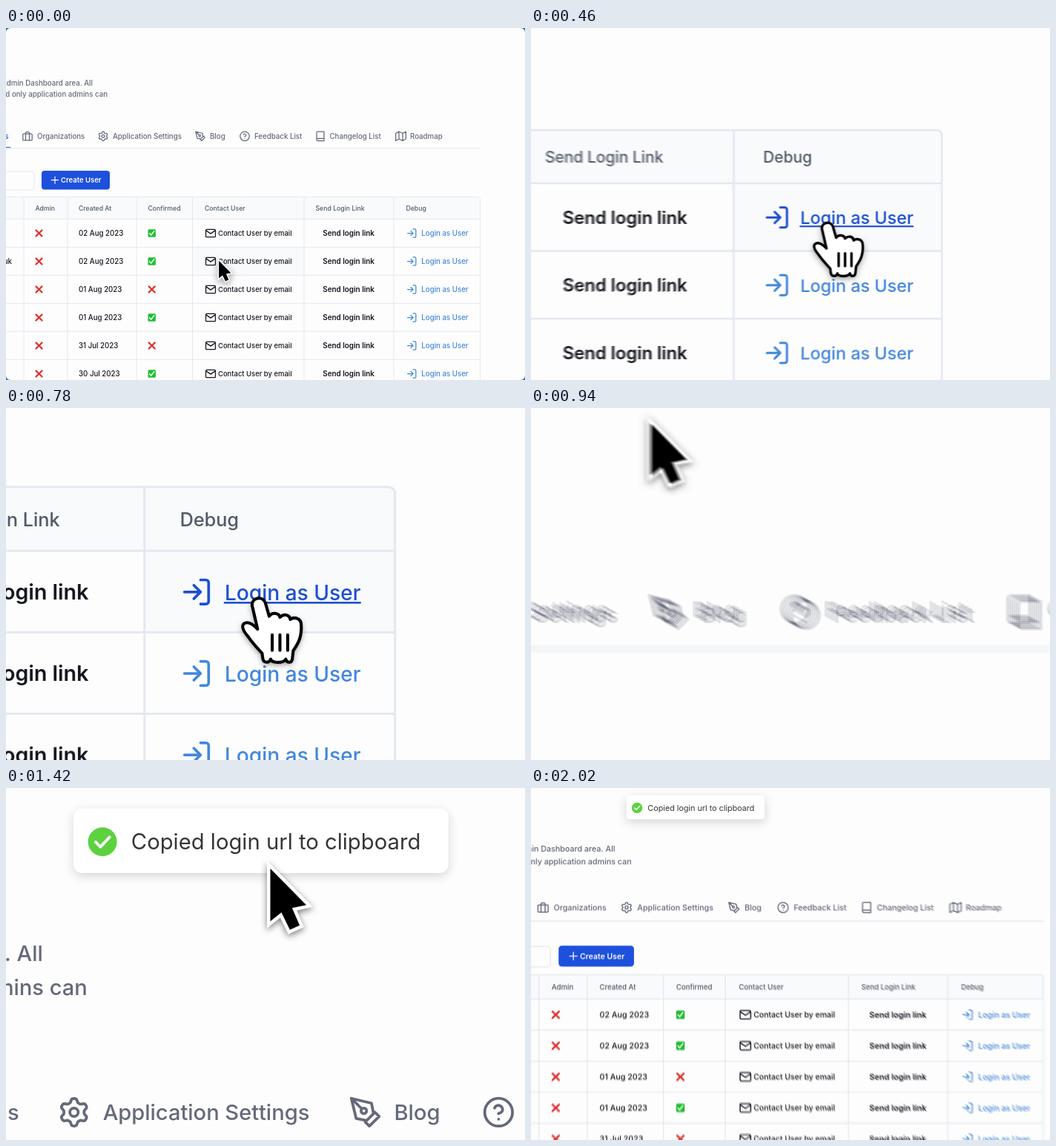
An HTML page with a canvas that plays this animation: 700x476 px, repeating every 2.04 s.

```html
<!DOCTYPE html>
<html lang="en">
<head>
<meta charset="utf-8">
<title>Admin dashboard</title>
<style>
html, body { margin: 0; width: 100%; height: 100%; overflow: hidden; background: #fdfdfd; }
canvas { display: block; }
</style>
</head>
<body>
<canvas id="stage" width="700" height="476"></canvas>
<script>
const W = 700, H = 476, LOOP = 2040;
const out = document.getElementById('stage').getContext('2d');
const buffer = document.createElement('canvas');
buffer.width = W;
buffer.height = H;
const c = buffer.getContext('2d');

const PAPER = '#fdfdfd', SHADE = '#f8fafc', LINE = '#e4e8f1', MUTED = '#64697a', HEAD = '#525a68',
  INK = '#14161f', LINK = '#4287de', LINK_HOVER = '#1d4fd0', BLUE = '#1d50dc';

// Critically damped spring from 0 to 1; t in ms, speed per second.
const spring = (t, start, speed) => {
  const x = Math.max(0, t - start) / 1000 * speed;
  return 1 - (1 + x) * Math.exp(-x);
};
const mix = (a, b, k) => a + (b - a) * k;
const ramp = (t, a, b) => Math.min(1, Math.max(0, (t - a) / (b - a)));

function gearPath() {
  let d = '';
  for (let i = 0; i < 72; i++) {
    const a = i * Math.PI / 36, r = 8.6 - 1.4 * Math.tanh(1.8 * Math.cos(6 * a));
    d += (i ? 'L' : 'M') + (12 + r * Math.cos(a)).toFixed(2) + ' ' + (12 + r * Math.sin(a)).toFixed(2);
  }
  return d + 'ZM15 12a3 3 0 1 1-6 0 3 3 0 0 1 6 0z';
}

// Outline icons on a 24 unit grid
const ICON = {
  bag: 'M4 7h16a2 2 0 0 1 2 2v10a2 2 0 0 1-2 2H4a2 2 0 0 1-2-2V9a2 2 0 0 1 2-2z M16 21V5a2 2 0 0 0-2-2h-4a2 2 0 0 0-2 2v16',
  gear: gearPath(),
  pen: 'M12 19l7-7 3 3-7 7z M18 13l-1.5-7.5L2 2l3.5 14.5L13 18z M2 2l7.6 7.6 M13 11a2 2 0 1 1-4 0 2 2 0 0 1 4 0z',
  help: 'M22 12a10 10 0 1 1-20 0 10 10 0 0 1 20 0z M9.1 9a3 3 0 0 1 5.8 1c0 2-3 3-3 3 M12 17h.01',
  book: 'M4 19.5A2.5 2.5 0 0 1 6.5 17H20 M6.5 2H20v20H6.5A2.5 2.5 0 0 1 4 19.5v-15A2.5 2.5 0 0 1 6.5 2z',
  map: 'M1 6v16l7-4 8 4 7-4V2l-7 4-8-4z M8 2v16 M16 6v16',
  mail: 'M4 4h16a2 2 0 0 1 2 2v12a2 2 0 0 1-2 2H4a2 2 0 0 1-2-2V6a2 2 0 0 1 2-2z M22 6l-10 7L2 6',
  login: 'M15 3h4a2 2 0 0 1 2 2v14a2 2 0 0 1-2 2h-4 M10 17l5-5-5-5 M15 12H3',
  plus: 'M12 4v16 M4 12h16'
};
for (const k in ICON) ICON[k] = new Path2D(ICON[k]);

const ARROW = new Path2D('M0 .8V24.6L5 20.6 8.8 28.4 13.2 26.4 9.8 18.6 16.2 17.2Z');
const HAND = new Path2D('M-3.2 3.2A3.2 3.2 0 0 1 3 2.2L4.8 8.5C6 6.6 9.3 6.8 9.8 9 11.5 7.2 14.3 7.6 14.6 10' +
  ' 16.5 8.6 19.6 9.4 19.7 12.5 20 18 18.5 21 16 24.5L15.6 28C15.5 30.5 13 30.5 12.5 28.5' +
  ' 11.5 30.5 6 30.5 5.5 28.5 5 30.5 2 30.5 1.8 28L1.5 25.8C-1 23-3 21-5 18' +
  ' -8 14.5-8 13-7 12-5 10.5-2.5 12.5-.6 14.5Z');
const FINGERS = new Path2D('M6.2 17.2v7.2M9.8 17.2v7.2M13.4 17.2v7.2');

const TABS = [['bag', 29, 42, 'Organizations'], ['gear', 131, 144, 'Application Settings'],
  ['pen', 262, 275, 'Blog'], ['help', 322, 335, 'Feedback List'],
  ['book', 424, 436.5, 'Changelog List'], ['map', 532.5, 545, 'Roadmap']];
const HEADS = [[39.5, 'Admin'], [98, 'Created At'], [191.5, 'Confirmed'], [268, 'Contact User'],
  [417.5, 'Send Login Link'], [539.5, 'Debug']];
const COLS = [24, 83, 176, 251.5, 402, 523, 639.5];
const ROWS = [['02 Aug 2023', 1], ['02 Aug 2023', 1], ['01 Aug 2023', 0],
  ['01 Aug 2023', 1], ['31 Jul 2023', 0], ['30 Jul 2023', 1]];
const TOP = 228.5, FIRST = 258.3, STEP = 38;

function text(s, x, y, color, size = 9.7, weight = 500, align = 'left') {
  c.font = `${weight} ${size}px Inter, sans-serif`;
  c.textAlign = align;
  c.fillStyle = color;
  c.fillText(s, x, y + size * .36);
}
function icon(name, x, y, color, size = 15) {
  c.save();
  c.translate(x - size / 2, y - size / 2);
  c.scale(size / 24, size / 24);
  c.strokeStyle = color;
  c.lineWidth = 2;
  c.stroke(ICON[name]);
  c.restore();
}
function line(color, width, ...p) {
  c.beginPath();
  for (let i = 0; i < p.length; i += 2) c.lineTo(p[i], p[i + 1]);
  c.strokeStyle = color;
  c.lineWidth = width;
  c.stroke();
}
function box(x, y, w, h, r, fill, stroke) {
  c.beginPath();
  c.roundRect(x, y, w, h, r);
  if (fill) { c.fillStyle = fill; c.fill(); }
  if (stroke) { c.strokeStyle = stroke; c.lineWidth = 1; c.stroke(); }
}
function shadow(color, blur, y) {
  c.shadowColor = color;
  c.shadowBlur = blur;
  c.shadowOffsetY = y;
}
function mark(x, y, yes) {
  if (yes) {
    box(x - 5.2, y - 5.2, 10.4, 10.4, 1.5, '#1fbf32');
    line('#fff', 1.5, x - 3, y + .2, x - 1, y + 2.6, x + 3, y - 2.8);
  } else {
    line('#e0302e', 2.3, x - 4, y - 4, x + 4, y + 4);
    line('#e0302e', 2.3, x + 4, y - 4, x - 4, y + 4);
  }
}

function page(mx, my) {
  box(0, 0, W, H, 6, PAPER);
  text('Welcome to the Admin Dashboard area. All', 117, 74.5, MUTED, 9.7, 500, 'right');
  text('and only application admins can', 137, 90, MUTED, 9.7, 500, 'right');

  line(LINE, 1, 0, 162.9, 640, 162.9);
  text('Users', 3.5, 146.4, BLUE, 9.7, 500, 'right');
  line(BLUE, 1, 0, 161.4, 6, 161.4);
  for (const [name, ix, tx, label] of TABS) {
    icon(name, ix, 146.3, MUTED);
    text(label, tx, 146.4, MUTED);
  }

  box(-200, 194, 238, 25, 4, null, LINE);
  box(48, 193, 92, 25.5, 4, BLUE);
  icon('plus', 66, 205.7, '#fff', 14);
  text('Create User', 74, 205.9, '#fff', 9.5, 600);

  box(-200, TOP, 839.5, FIRST - TOP, [0, 3, 0, 0], SHADE);
  const row = Math.floor((my - FIRST) / STEP);
  const col = COLS.findIndex((x, i) => mx >= x && mx < COLS[i + 1]);
  if (row >= 0 && col >= 0) {
    c.fillStyle = SHADE;
    c.fillRect(COLS[col], FIRST + row * STEP, COLS[col + 1] - COLS[col], STEP);
  }

  box(-200, TOP, 839.5, 400, 3, null, LINE);
  for (const x of COLS.slice(0, 6)) line(LINE, 1, x, TOP, x, H);
  for (const [x, label] of HEADS) text(label, x, 243.7, HEAD, 8.7);
  ROWS.forEach(([date, ok], i) => {
    const y = FIRST + i * STEP, m = y + 19.2;
    line(LINE, 1, 0, y, 639.5, y);
    mark(44.5, m, false);
    text(date, 98, m, INK);
    mark(196.7, m, ok);
    icon('mail', 276, m, INK, 15.5);
    text('Contact User by email', 286, m, INK, 9.45);
    text('Send login link', 427.3, m, INK, 9.9, 600);
    const over = row === i && col === 5, color = over ? LINK_HOVER : LINK;
    icon('login', 547.2, m, color);
    text('Login as User', 560.3, m + .2, color);
    if (over) line(color, .9, 560.3, m + 5, 623.3, m + 5);
  });
  text('uk', 8, FIRST + STEP + 19.2, INK, 9.7, 500, 'right');
}

function toast(t) {
  const enter = spring(t, 960, 45);
  if (!enter) return;
  c.save();
  c.globalAlpha = Math.min(1, enter * 1.3);
  c.translate(0, mix(-40, 0, enter));
  shadow('rgba(0,0,0,.16)', 14, 4);
  box(130.7, 9.3, 168.8, 29.1, 4, '#fff');
  shadow('transparent', 0, 0);
  const pop = ramp(t, 1010, 1090), r = 6.5 * pop + .5 * pop * (1 - ramp(t, 1120, 1180));
  c.beginPath();
  c.arc(143.8, 24.3, r, 0, 7);
  c.fillStyle = '#5cd23e';
  c.fill();
  const drawn = ramp(t, 1070, 1150);
  if (drawn) {
    c.setLineDash([9.2 * drawn, 20]);
    line('#fff', 1.3, 140.7, 24.4, 142.9, 26.6, 147, 22.2);
  }
  text('Copied login url to clipboard', 156.7, 24.2, '#363636', 9.75, 400);
  c.restore();
}

function cursor(t, x, y) {
  c.save();
  c.globalAlpha = 1 - ramp(t, 1600, 1700);
  c.translate(x, y);
  shadow('rgba(0,0,0,.5)', 8, 3);
  if (x > COLS[5] && y > FIRST) {
    c.fillStyle = '#fff';
    c.fill(HAND);
    shadow('transparent', 0, 0);
    c.strokeStyle = '#000';
    c.lineWidth = 1.4;
    c.stroke(HAND);
    c.stroke(FINGERS);
  } else {
    c.lineJoin = 'miter';
    c.strokeStyle = '#fff';
    c.lineWidth = 3;
    c.stroke(ARROW);
    shadow('transparent', 0, 0);
    c.fillStyle = '#000';
    c.fill(ARROW);
  }
  c.restore();
}

function scene(t) {
  const zoom = 1 + 2 * spring(t, 114, 7.1) - 2 * spring(t, 1765, 18.3);
  const pan = spring(t, 790, 17);
  const fx = mix(700, 150.5, pan), fy = mix(292.6, 0, pan);
  const go = spring(t, 0, 18), back = spring(t, 790, 26);
  const mx = mix(mix(287, 576.2, go), 219.3, back), my = mix(mix(314, 280.3, go), 35.6, back);

  c.setTransform(1, 0, 0, 1, 0, 0);
  c.fillStyle = '#2f74a0';
  c.fillRect(0, 0, W, H);
  c.setTransform(zoom, 0, 0, zoom, fx * (1 - zoom), fy * (1 - zoom));
  c.lineCap = c.lineJoin = 'round';
  page(mx, my);
  toast(t);
  cursor(t, mx, my);
}

// Motion blur: average several moments inside a short shutter.
const SAMPLES = 7, SHUTTER = 4.5;
function frame(now) {
  const t = now % LOOP;
  for (let i = 0; i < SAMPLES; i++) {
    const at = t + (i / (SAMPLES - 1) - .5) * SHUTTER;
    scene(Math.min(LOOP, Math.max(0, at)));
    out.globalAlpha = 1 / (i + 1);
    out.drawImage(buffer, 0, 0);
  }
}
const start = performance.now();
(function tick() {
  frame(performance.now() - start);
  requestAnimationFrame(tick);
})();
</script>
</body>
</html>
```
